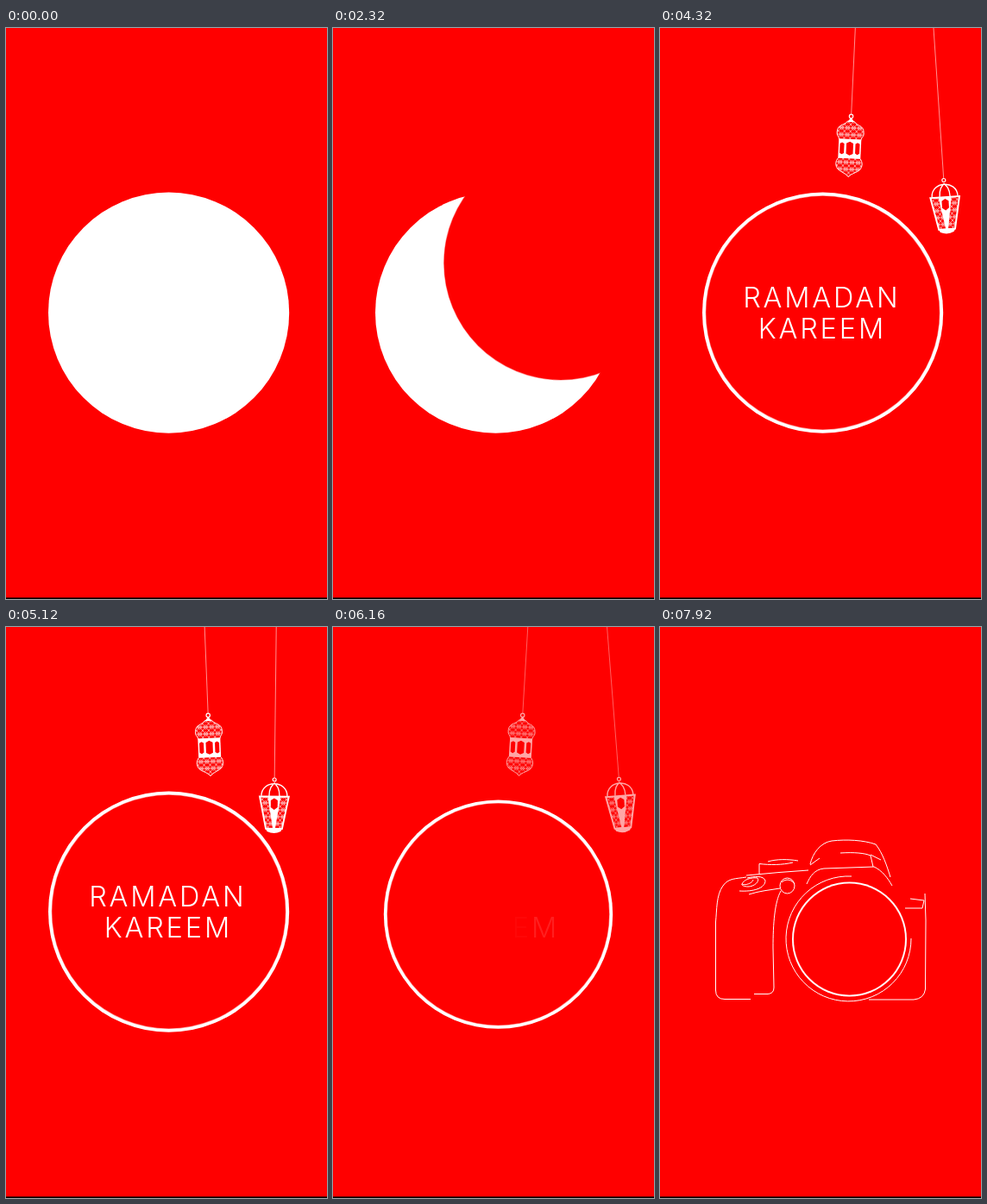
Recreate the animation shown at these times as an HTML page. Size 372 by 662 pixels, loop 8000 ms.

```html
<!DOCTYPE html>
<html lang="en">
<head>
<meta charset="utf-8">
<title>Ramadan Kareem</title>
<style>
  html, body { margin: 0; width: 100%; height: 100%; overflow: hidden; background: #f00; }
  svg { display: block; width: 100%; height: 100%; }
  text { font: 300 32.5px Inter, Lato, sans-serif; letter-spacing: 2.8px; text-anchor: middle; fill: #fff; }
  .line { fill: none; stroke: #fff; }
  .string { fill: none; stroke: #fff; stroke-width: .7; stroke-opacity: .8; }
  .lace { fill: url(#lace); stroke: #fff; stroke-width: .9; }
  #camera path { fill: none; stroke: #fff; stroke-width: 1; }
</style>
</head>
<body>
<svg viewBox="0 0 372 662" preserveAspectRatio="none">
  <defs>
    <pattern id="lace" width="7" height="8" patternUnits="userSpaceOnUse">
      <path class="line" stroke-width=".65" d="M0 0L7 8M7 0L0 8M0 4H7M3.5 1.5L6 4L3.5 6.5L1 4Z"/>
    </pattern>
  </defs>
  <rect width="372" height="662" fill="#f00"/>

  <g id="moon">
    <circle r="139.6" fill="#fff"/>
    <circle id="shade" r="135.3" fill="#f00" stroke="#f00" stroke-width="1.2" stroke-opacity=".4"/>
  </g>

  <g id="camera">
    <path d="M105 431.5H75Q64.5 431.5 64.5 421V342C66 328 65 311 73 300C79 291 88 292 100 290"/>
    <path d="M109 425.5H125Q132 425 132 418L131 372C131 343 133 319 140 306"/>
    <path d="M100 288L138 284.5L172 282"/>
    <path d="M92 306C108 307 122 303 122 294C120 288 109 289 101 291"/>
    <path d="M95 298C97 293 105 290 113 291C116 295 109 301 102 301C97 301 94 299 95 298C99 300 107 297 108 293"/>
    <path d="M103 310C115 306 127 305 139 303"/>
    <path d="M156 300A8.500 9 0 1 1 139 300A8.500 9 0 1 1 156 300M141 296C146 291 153 293 156 298"/>
    <path d="M115 286V274.5C127 276 142 276 154 273"/>
    <path d="M125 272C135 269 148 269 160 271"/>
    <path d="M174 275C177 262 186 250 199 248C216 246 236 247 250 252C258 262 263 277 267 290"/>
    <path d="M174 276L185 268"/>
    <path d="M170 298C174 289 179 281 190 280L248 278C257 282 264 291 269 300"/>
    <path d="M209 262C225 261 237 262 244 265L247 278"/>
    <path d="M244 264L256 270"/>
    <path d="M291 361A72.500 72.500 0 1 1 222 289"/>
    <path d="M290 315L306 317L304 326H284"/>
    <path d="M307 309L308 340L307.5 420Q306 431 294 432L242 432"/>
  </g>

  <g id="lamps">
    <g id="lampA">
      <path class="string" d="M0 -300V100"/>
      <circle class="line" cy="102.5" r="2.2" stroke-width="1.2"/>
      <path d="M-4 109L0 104L4 109Z" fill="#fff"/>
      <path class="lace" d="M-4 108.500H4C8 114 15 112 15.500 121C16 126 13 126 12.500 130H-12.500C-13 126 -16 126 -15.500 121C-15 112 -8 114 -4 108.500Z"/>
      <path d="M-13 129H13V151H-13Z" fill="#fff"/>
      <path d="M-4 134L0 132L4 134V146L0 148L-4 146ZM-11.5 134.5L-9 133L-6.5 134.5V145.5L-9 147L-11.5 145.5ZM11.5 134.5L9 133L6.5 134.5V145.5L9 147L11.5 145.5Z" fill="#f00"/>
      <path class="lace" d="M-12.500 151H12.500C16 155 16 160 13 164C9 168 4 168 0 173C-4 168 -9 168 -13 164C-16 160 -16 155 -12.500 151Z"/>
    </g>
    <g id="lampB">
      <path class="string" d="M0 -300V175"/>
      <circle class="line" cy="177" r="2" stroke-width="1.2"/>
      <path class="line" stroke-width="1.4" d="M-15 196C-15 177 15 177 15 196M-6 196C-6 187 -3 184 0 181C3 184 6 187 6 196"/>
      <path class="lace" d="M-16.5 197H16.5L9 234H-9Z"/>
      <path class="line" stroke-width="1.7" d="M-17 196.500H17L9.500 234H-9.500Z"/>
      <path d="M-7.5 197H7.500L1.500 233H-1.500ZM-10 233H10L8 237Q0 241 -8 237Z" fill="#fff"/>
      <path d="M-4 201L0 198.500L4 201V209L0 212L-4 209Z" fill="#f00"/>
    </g>
  </g>

  <text x="187.3" y="323.6" data-in="2880" data-first="0">RAMADAN</text>
  <text x="187.8" y="360" data-in="3400" data-first="7">KAREEM</text>

  <rect y="660.4" width="372" height="1.6" fill="#000"/>
</svg>
<script>
const LOOP = 8000;
const $ = id => document.getElementById(id);
const ramp = (t, from, to) => Math.min(1, Math.max(0, (t - from) / (to - from)));
const ease = (t, from, to) => { const u = ramp(t, from, to); return u * u * (3 - 2 * u); };
const mix = (a, b, u) => a + (b - a) * u;

// Angles in radians; "peak" and "back" are the two ends of the swing.
const lamps = [
  { el: $('lampA'), x: 228.4, y: -44, fall: 178, from: 2900, to: 3480, start: 0.02, peak: -0.06, back: 0.04 },
  { el: $('lampB'), x: 313.8, y: -48, fall: 245, from: 2790, to: 3354, start: 0, peak: 0.079, back: -0.012 }
];
const HALF_SWING = 1015, FIRST_PEAK = 4080;

const letters = [];
for (const line of document.querySelectorAll('text')) {
  const chars = [...line.textContent];
  line.textContent = '';
  chars.forEach((char, i) => {
    const el = document.createElementNS('http://www.w3.org/2000/svg', 'tspan');
    el.textContent = char;
    line.append(el);
    letters.push({ el, shown: +line.dataset.in, gone: 5200 + 45 * (+line.dataset.first + i) });
  });
}

const strokes = [...document.querySelectorAll('#camera path')];
for (const path of strokes) path.setAttribute('pathLength', 1);

function drawMoon(t) {
  const shrink = ease(t, 5800, 7700);
  const scale = mix(1, 66.5 / 139.6, shrink);
  $('moon').setAttribute('transform',
    `translate(${mix(188.6, 219.5, shrink)} ${mix(330.1, 362, shrink)}) scale(${scale})`);
  const distance = 366 * (1 - ease(t, 0, 3480));
  $('shade').setAttribute('cx', 0.795 * distance);
  $('shade').setAttribute('cy', -0.607 * distance);
}

function drawLamps(t) {
  $('lamps').setAttribute('opacity', 1 - ramp(t, 6000, 6460));
  const swing = (1 + Math.cos(Math.PI * (t - FIRST_PEAK) / HALF_SWING)) / 2;
  for (const lamp of lamps) {
    const rest = t < FIRST_PEAK ? lamp.start : lamp.back;
    const angle = t < FIRST_PEAK - HALF_SWING ? lamp.start : mix(rest, lamp.peak, swing);
    const lift = lamp.fall * (1 - ease(t, lamp.from, lamp.to));
    lamp.el.setAttribute('transform',
      `translate(${lamp.x} ${lamp.y - lift}) rotate(${-angle * 180 / Math.PI}) translate(0 ${-lamp.y})`);
    lamp.el.setAttribute('visibility', t < lamp.from ? 'hidden' : 'visible');
  }
}

function drawText(t) {
  for (const { el, shown, gone } of letters) {
    el.setAttribute('fill-opacity', ramp(t, shown, shown + 500) * (1 - ramp(t, gone, gone + 480)));
  }
}

function drawCamera(t) {
  const drawn = ramp(t, 7100, 7920);
  $('camera').setAttribute('visibility', drawn > 0 ? 'visible' : 'hidden');
  for (const path of strokes) {
    path.setAttribute('stroke-dasharray', drawn < 1 ? `${drawn} 2` : 'none');
  }
}

function render(t) {
  drawMoon(t);
  drawLamps(t);
  drawText(t);
  drawCamera(t);
}

const origin = performance.now();
function tick() {
  render((performance.now() - origin) % LOOP);
  requestAnimationFrame(tick);
}
render(0);
requestAnimationFrame(tick);
</script>
</body>
</html>
```
